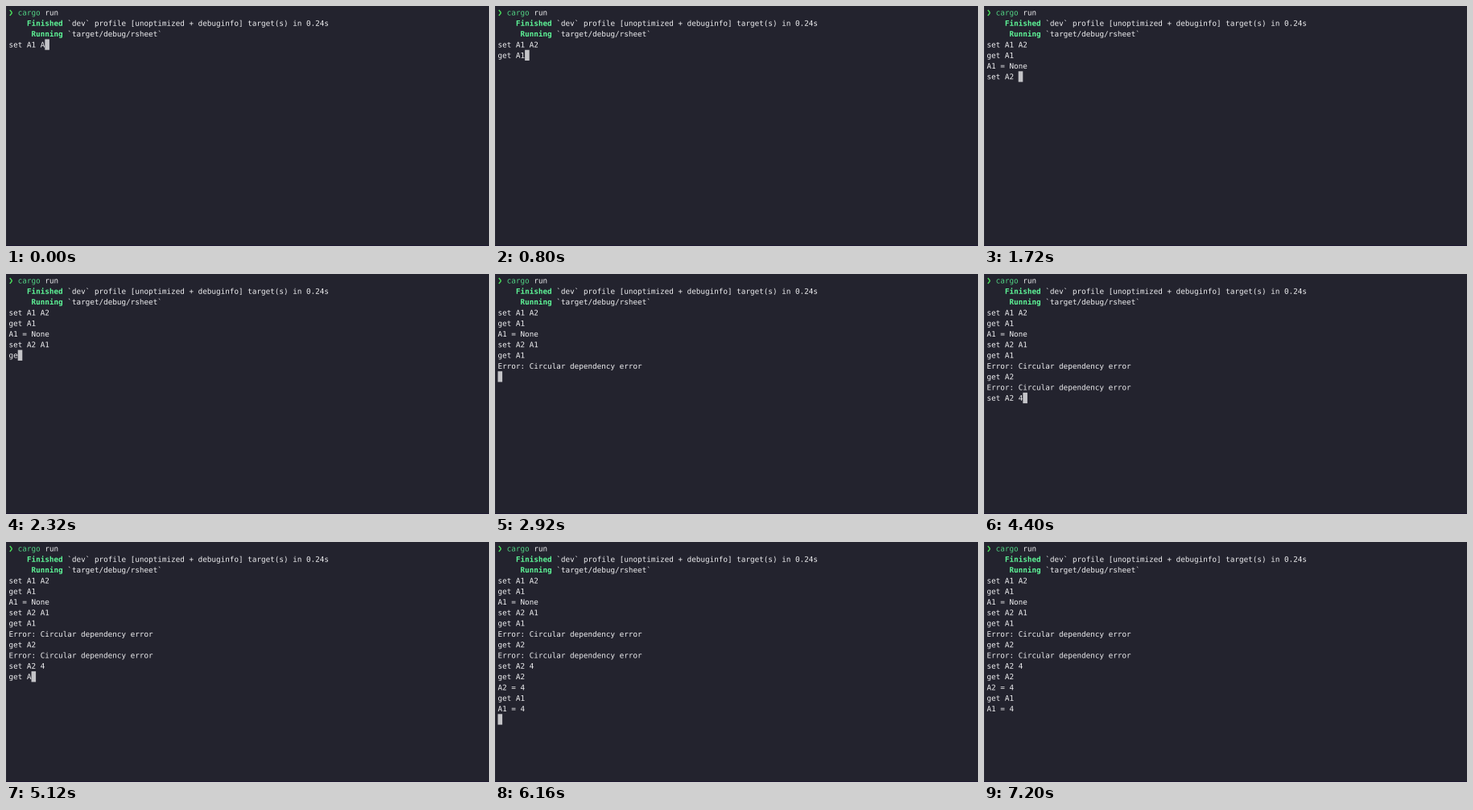
These frames come from a looping animation (600 by 299 pixels, 7.24 s). An HTML page with a canvas:

```html
<!DOCTYPE html>
<html lang="en">
<head>
<meta charset="utf-8">
<title>Terminal session</title>
<style>
  html, body { margin: 0; width: 100%; height: 100%; overflow: hidden; background: #23232e; }
  canvas { display: block; }
</style>
</head>
<body>
<canvas id="stage"></canvas>
<script>
const W = 600, H = 299, LOOP = 7240, BLINK_OFF = 6760;
const CHAR = 5.602, PITCH = 13.3, LEFT = 3.5, TOP = 1.5, BASE = 10;
const FONT = `${CHAR / 0.602}px "DejaVu Sans Mono", monospace`;
const BACK = '#23232e', TEXT = '#f0f0f2', GREEN = '#52d485', BRIGHT = '#5ef597', CURSOR = '#c4c4c8';
const SHARP = 4; // text is drawn large and scaled down, so rows keep fractional positions

// Typed command with its reply; times of the first key, last key and Enter.
const session = [
  { command: 'set A1 A2', first: -600, last: 40, enter: 240 },
  { command: 'get A1', first: 400, last: 760, enter: 880, reply: 'A1 = None' },
  { command: 'set A2 A1', first: 1200, last: 1920, enter: 2040 },
  { command: 'get A1', first: 2240, last: 2640, enter: 2840, reply: 'Error: Circular dependency error' },
  { command: 'get A2', first: 2960, last: 3360, enter: 3520, reply: 'Error: Circular dependency error' },
  { command: 'set A2 4', first: 3760, last: 4400, enter: 4640 },
  { command: 'get A2', first: 4800, last: 5200, enter: 5240, reply: 'A2 = 4' },
  { command: 'get A1', first: 5480, last: 5960, enter: 6160, reply: 'A1 = 4' }
];

const dpr = window.devicePixelRatio || 1;
const stage = document.getElementById('stage');
const view = stage.getContext('2d');
stage.width = W * dpr;
stage.height = H * dpr;
stage.style.width = W + 'px';
stage.style.height = H + 'px';

const buffer = document.createElement('canvas');
const ctx = buffer.getContext('2d');
buffer.width = stage.width * SHARP;
buffer.height = stage.height * SHARP;
ctx.scale(dpr * SHARP, dpr * SHARP);
ctx.textRendering = 'geometricPrecision';

function fill(color, x, y, w, h) {
  ctx.fillStyle = color;
  ctx.fillRect(x, y, w, h);
}

function write(text, col, row, color = TEXT, weight = 400) {
  ctx.font = `${weight} ${FONT}`;
  ctx.fillStyle = color;
  ctx.fillText(text, LEFT + col * CHAR, TOP + row * PITCH + BASE);
}

function drawPrompt() {
  ctx.strokeStyle = '#4be35c';
  ctx.lineWidth = 1.4;
  ctx.beginPath();
  ctx.moveTo(4.8, 5);
  ctx.lineTo(7.1, 7.9);
  ctx.lineTo(7.1, 9.1);
  ctx.lineTo(4.8, 12);
  ctx.stroke();
}

function drawHeader() {
  drawPrompt();
  write('cargo', 2, 0, GREEN);
  write('run', 8, 0);
  write('Finished', 4, 1, BRIGHT, 700);
  write('`dev` profile [unoptimized + debuginfo] target(s) in 0.24s', 13, 1);
  write('Running', 5, 2, BRIGHT, 700);
  write('`target/debug/rsheet`', 13, 2);
}

// Keys come quickly at first and slow down a little towards the last one.
function typedCount({ command, first, last }, t) {
  if (t < first) return 0;
  const progress = Math.min(1, (t - first) / (last - first));
  return 1 + Math.floor((command.length - 1) * progress ** (1 / 1.3));
}

function drawSession(t) {
  let row = 3, col = 0;
  for (const entry of session) {
    col = typedCount(entry, t);
    write(entry.command.slice(0, col), 0, row);
    if (t < entry.enter) break;
    row++;
    col = 0;
    if (entry.reply) write(entry.reply, 0, row++);
  }
  if (t < BLINK_OFF) fill(CURSOR, LEFT + col * CHAR, TOP + row * PITCH, CHAR, PITCH);
}

function draw(t) {
  fill(BACK, 0, 0, W, H);
  fill('#2c2c37', 0, 0, 1, H);
  fill('#1d1730', 0, H - 1, W, 1);
  drawHeader();
  drawSession(t);
  view.imageSmoothingQuality = 'high';
  view.drawImage(buffer, 0, 0, stage.width, stage.height);
}

const start = performance.now();
function tick() {
  draw((performance.now() - start) % LOOP);
  requestAnimationFrame(tick);
}
tick();
</script>
</body>
</html>
```
